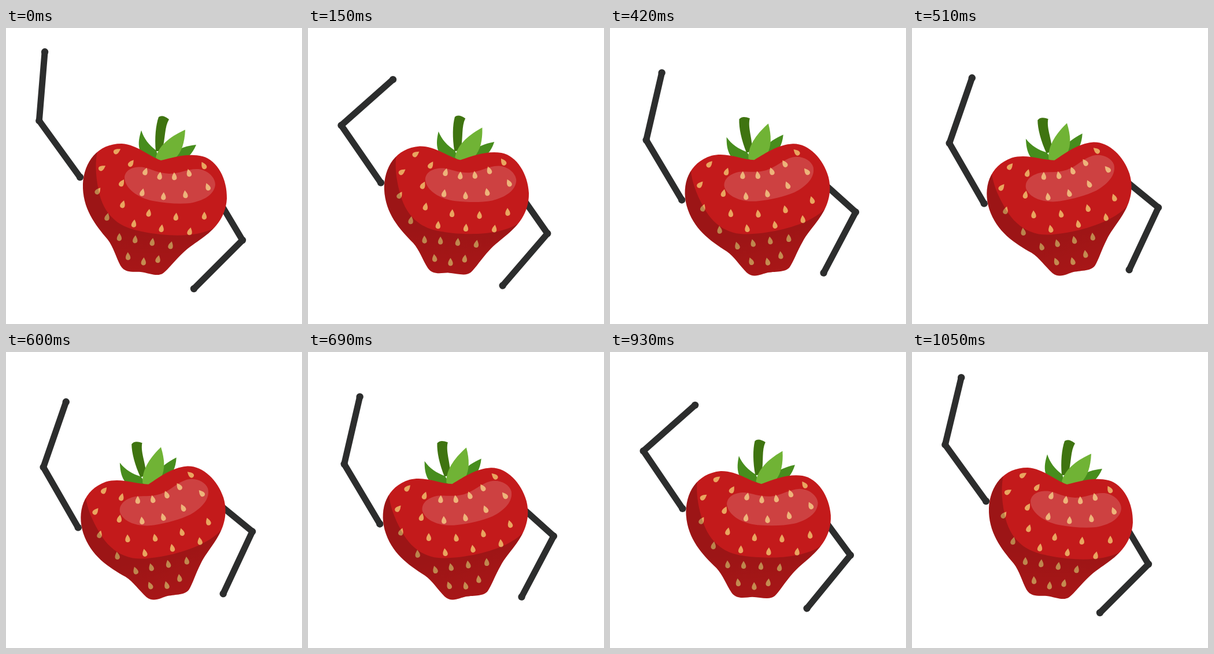
An HTML page with a canvas that plays this animation: 512 by 512 pixels, repeating every 1080 ms.

```html
<!DOCTYPE html>
<html lang="en">
<head>
<meta charset="utf-8">
<title>Waving strawberry</title>
<style>
  html, body { margin: 0; width: 100%; height: 100%; overflow: hidden; background: #fff; }
  canvas { display: block; width: 100vw; height: 100vh; object-fit: contain; }
</style>
</head>
<body>
<canvas id="stage" width="512" height="512"></canvas>
<script>
(() => {
  const ctx = document.getElementById('stage').getContext('2d');
  const LOOP = 1080, STEP = 30, HALF = LOOP / 2, LAG = 15;
  const RAD = Math.PI / 180;
  const PIVOT = [256.5, 290], SHOULDER = [128, 258];
  const UPPER = 120.5, FORE = 119.5;

  const clamp = (v, lo, hi) => Math.min(hi, Math.max(lo, v));
  const ease = u => (1 - Math.cos(Math.PI * u)) / 2;

  // The motion runs forward for half a loop and then back again
  const mirror = t => HALF - Math.abs(HALF - (t - LAG + LOOP) % LOOP);

  const tilt = s => clamp(10 + 0.048 * (s - 255), 0, 19.9);

  // Forearm angle in degrees: up, down, and a smaller swing up
  const SWING = [[0, 3.5], [145, 49], [400, 13], [HALF, 21]];
  function wave(s) {
    const i = Math.max(1, SWING.findIndex(k => k[0] >= s));
    const [s0, a0] = SWING[i - 1], [s1, a1] = SWING[i];
    return a0 + (a1 - a0) * ease((s - s0) / (s1 - s0));
  }

  const body = new Path2D(`M268 229 C292 223 316 216 340 222 C366 229 383 262 382 295
    C380 330 358 350 340 363 C328 372 316 379 306 389 C292 402 281 417 272 424
    C262 431 248 424 233 422 C222 421 206 425 198 411 C190 396 186 379 176 366
    C154 340 132 312 133 270 C135 232 158 200 200 200 C228 202 247 222 268 229 Z`);

  // Everything outside the lit front
  const shade = new Path2D(`M100 180 H420 V450 H100 Z
    M158 214 C154 232 155 256 160 280 C164 301 173 319 187 331
    C203 346 225 350 245 354 C280 360 330 363 362 345 L420 330 V180 H158 Z`);

  const shine = new Path2D(`M205 258 C207 244 222 239 238 241 C252 244 262 251 282 252
    C302 252 314 243 333 244 C350 246 362 259 362 271 C360 289 341 299 318 303
    C298 305 276 303 254 299 C228 294 205 277 205 258 Z`);

  const leaves = [
    ['#3f7410', 'M259 213 C257 190 259 168 264 154 Q271 149 282 158 C274 171 276 190 270 213 Z'],
    ['#478d1d', 'M234 177 C239 192 247 202 260 212 L266 232 L231 210 C228 198 231 187 234 177 Z'],
    ['#478d1d', 'M329 202 C313 204 302 207 292 214 L290 232 L316 222 Q324 214 329 202 Z'],
    ['#70b335', 'M310 176 C290 185 265 200 259 224 L268 234 L292 226 C304 215 309 198 310 176 Z']
  ].map(([fill, d]) => [fill, new Path2D(d)]);

  const seed = new Path2D('M0 -7.2 C2 -4 4.2 -1 4.2 2.2 C4.2 7.8 -4.2 7.8 -4.2 2.2 C-4.2 -1 -2 -4 0 -7.2 Z');

  // Seeds sit on arcs: count, then first, middle and last point
  const rows = [
    [7, 192, 213, 266, 256, 342, 238],
    [6, 166, 242, 254, 289, 349, 275],
    [5, 159, 282, 247, 320, 343, 325],
    [4, 175, 327, 245, 343, 318, 352],
    [4, 196, 362, 238, 368, 285, 376],
    [3, 211, 395, 238, 404, 263, 400]
  ];

  const arc = (a, m, b, u) =>
    a * (1 - u) * (1 - 2 * u) + 4 * m * u * (1 - u) + b * u * (2 * u - 1);

  function drawSeeds() {
    ctx.fillStyle = '#e9a55f';
    for (const [n, x0, y0, xm, ym, x1, y1] of rows) {
      for (let i = 0; i < n; i++) {
        const u = i / (n - 1);
        const x = arc(x0, xm, x1, u), y = arc(y0, ym, y1, u);
        const lean = (285 - x) * (340 - y) / 200 + Math.max(0, y - 290) / 6;
        ctx.save();
        ctx.translate(x, y);
        ctx.rotate(lean * RAD);
        ctx.fill(seed);
        ctx.restore();
      }
    }
  }

  const dark = ctx.createLinearGradient(0, 345, 0, 425);
  dark.addColorStop(0, 'rgba(0,0,0,0.2)');
  dark.addColorStop(1, 'rgba(0,0,0,0.14)');

  function drawBerry() {
    for (const [fill, leaf] of leaves) {
      ctx.fillStyle = fill;
      ctx.fill(leaf);
    }
    ctx.fillStyle = '#c31a1b';
    ctx.fill(body);
    drawSeeds();
    ctx.save();
    ctx.clip(body);
    ctx.fillStyle = dark;
    ctx.fill(shade, 'evenodd');
    ctx.restore();
    ctx.fillStyle = 'rgba(255,255,255,0.17)';
    ctx.fill(shine);
  }

  function drawArm(joints) {
    ctx.strokeStyle = ctx.fillStyle = '#2c2d2d';
    ctx.lineWidth = 11;
    ctx.lineJoin = 'round';
    ctx.beginPath();
    joints.forEach(p => ctx.lineTo(...p));
    ctx.stroke();
    for (const [x, y] of joints) {
      ctx.beginPath();
      ctx.arc(x, y, 6.2, 0, 2 * Math.PI);
      ctx.fill();
    }
  }

  // Angle is clockwise from straight up
  const reach = ([x, y], length, deg) =>
    [x + length * Math.sin(deg * RAD), y - length * Math.cos(deg * RAD)];

  function spin([x, y], deg) {
    const c = Math.cos(deg * RAD), s = Math.sin(deg * RAD);
    const dx = x - PIVOT[0], dy = y - PIVOT[1];
    return [PIVOT[0] + dx * c + dy * s, PIVOT[1] - dx * s + dy * c];
  }

  function draw(t) {
    const s = mirror(t), lean = tilt(s);
    ctx.fillStyle = '#fff';
    ctx.fillRect(0, 0, 512, 512);

    const shoulder = spin(SHOULDER, lean);
    const elbow = reach(shoulder, UPPER, 0.3 * lean - 35.9);
    drawArm([shoulder, elbow, reach(elbow, FORE, wave(s))]);

    ctx.save();
    ctx.translate(...PIVOT);
    ctx.rotate(-lean * RAD);
    ctx.translate(-PIVOT[0], -PIVOT[1]);
    drawArm([[350, 268], [409, 367], [325, 451]]);
    drawBerry();
    ctx.restore();
  }

  const begin = performance.now();
  function tick() {
    const t = (performance.now() - begin) % LOOP;
    draw(Math.floor(t / STEP) * STEP);
    requestAnimationFrame(tick);
  }
  tick();
})();
</script>
</body>
</html>
```
